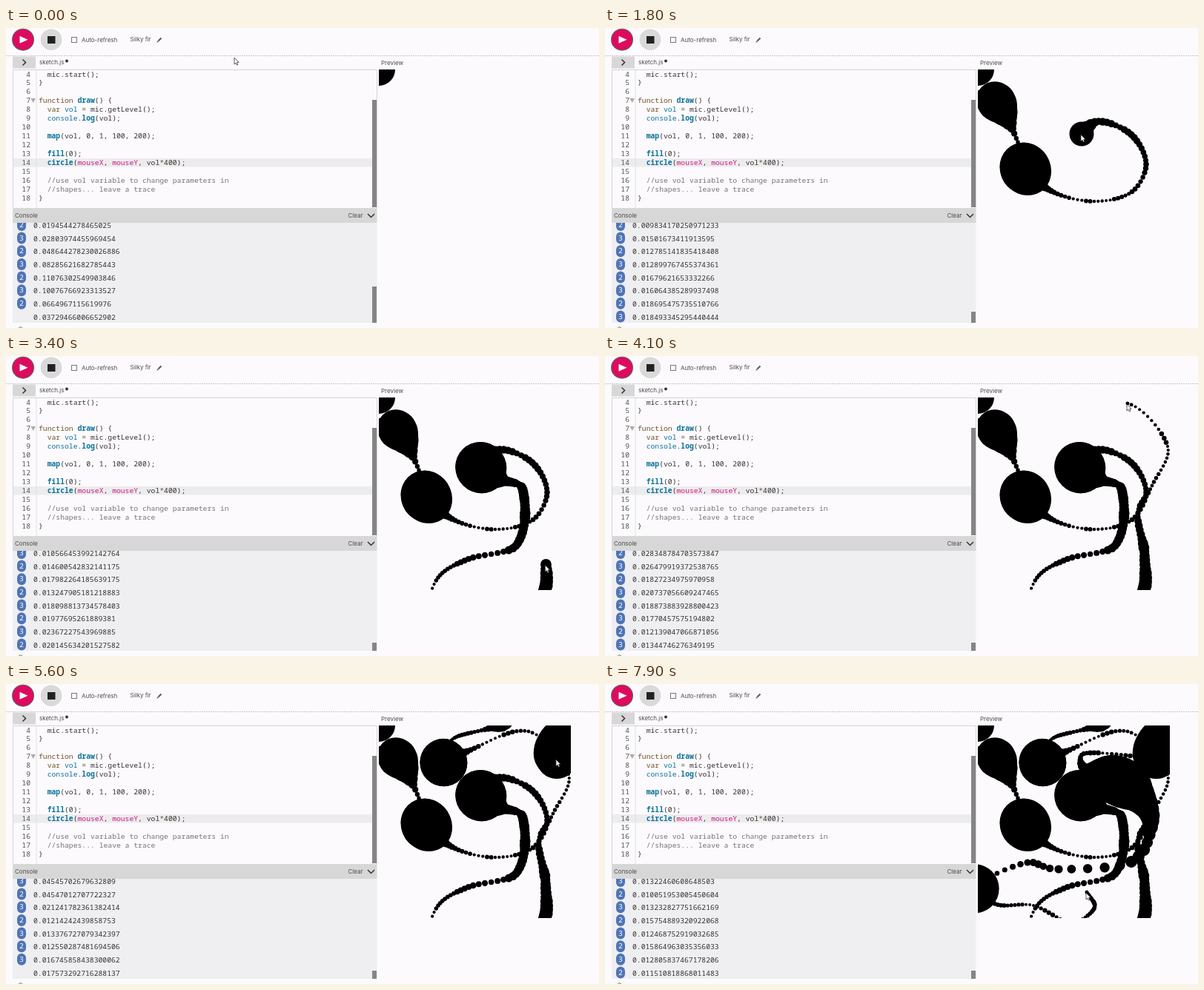
These frames come from a looping animation (800 px wide and 405 px high, 8000 ms). An HTML page with a canvas:

```html
<!DOCTYPE html>
<html lang="en">
<head>
<meta charset="utf-8">
<title>Sound sketch</title>
<style>
  html, body { margin: 0; width: 100%; height: 100%; overflow: hidden; background: #fcfafd; }
  canvas { display: block; }
</style>
</head>
<body>
<canvas id="stage" width="800" height="405"></canvas>
<script>
const ctx = document.getElementById('stage').getContext('2d');
const LOOP = 8000, STEP = 100, DRAWS_PER_STEP = 6, LOGS_PER_STEP = 2.7, LOG_LAG = 18;
const UI = '8px Inter, sans-serif';
const MONO = '9.73px "Noto Sans Mono", monospace';
const BLUE = '#0b7299', BROWN = '#704f21', PINK = '#d3177f', INK = '#333', UI_INK = '#4a4a4a';

// Turning points of the mouse: [sketch frame, x, y].
const mouse = [
  [0, 309, 39], [18, 498, 86], [28, 531, 103], [36, 557, 154], [48, 567, 190],
  // wide arc
  [60, 606, 222], [70, 660, 234], [80, 711, 221], [87, 730, 184], [95, 710, 144], [103, 666, 126],
  // hook
  [108, 643, 143], [116, 643, 153], [122, 666, 166], [131, 697, 180], [147, 688, 256],
  [156, 624, 274], [166, 583, 299], [174, 578, 335],
  // up the right side and along the top
  [195, 718, 325], [206, 728, 270], [216, 719, 212], [224, 738, 175], [234, 759, 122], [246, 705, 64],
  [261, 622, 91], [270, 591, 107], [287, 603, 74], [300, 655, 59], [316, 730, 34], [324, 755, 48],
  // through the middle to the lower left
  [336, 743, 101], [342, 764, 103], [351, 720, 98], [364, 646, 94], [370, 647, 114], [384, 708, 140],
  [391, 736, 185], [397, 710, 240], [402, 612, 250], [407, 570, 241], [414, 506, 267],
  [423, 501, 279], [432, 530, 298], [442, 578, 299], [452, 628, 322], [462, 660, 303], [474, 650, 281]
];

// Sounds heard by the microphone: [sketch frame, loudness, length].
const sounds = [
  [-24, 20, 5], [27, 24, 4.5], [48, 31, 5.5], [96, 2, 8], [114, 31, 6.5], [138, 4, 14],
  [199, 6, 14], [271, 29, 6], [303, 8, 3], [333, 29, 8], [381, 31, 8], [398, 4, 9], [421, 31, 4]
];

const random = n => Math.abs(Math.sin(n * 12.9898) * 43758.5453) % 1;

function radius(f) {
  const hiss = 1.9 + 1.5 * random(Math.floor(f / 2.5) + 50);
  return sounds.reduce((sum, [at, peak, len]) => sum + peak * Math.exp(-(((f - at) / len) ** 2)), hiss);
}

// Hermite curve through the turning points.
function mouseAt(f) {
  const last = mouse.length - 1;
  const key = i => mouse[Math.max(0, Math.min(last, i))];
  const i = Math.max(0, Math.min(last, mouse.findIndex(k => k[0] >= f)) - 1);
  const [a, b, c, d] = [key(i - 1), key(i), key(i + 1), key(i + 2)];
  const span = c[0] - b[0], u = (f - b[0]) / span;
  return [1, 2].map(n => {
    const m0 = (c[n] - a[n]) / (c[0] - a[0]) * span;
    const m1 = (d[n] - b[n]) / (d[0] - b[0]) * span;
    const rise = c[n] - b[n];
    return b[n] + u * (m0 + u * (3 * rise - 2 * m0 - m1 + u * (m0 + m1 - 2 * rise)));
  });
}

const code = [
  '  mic.start();', '}', '', 'function draw() {', '  var vol = mic.getLevel();',
  '  console.log(vol);', '', '  map(vol, 0, 1, 100, 200);', '', '  fill(0);',
  '  circle(mouseX, mouseY, vol*400);', '', '  //use vol variable to change parameters in',
  '  //shapes... leave a trace', '}'
];
const tint = {
  function: BROWN, var: BROWN, '=': BROWN, '*': BROWN, mouseX: PINK, mouseY: PINK,
  console: BLUE, log: BLUE, draw: BLUE, map: BLUE, fill: BLUE, circle: BLUE
};
const bold = ['draw', 'log', 'map', 'fill', 'circle'];

function box(x, y, w, h, color) {
  ctx.fillStyle = color;
  ctx.fillRect(x, y, w, h);
}
function disc(x, y, r, color) {
  ctx.fillStyle = color;
  ctx.beginPath();
  ctx.arc(x, y, r, 0, 2 * Math.PI);
  ctx.fill();
}
function poly(color, ...pts) {
  ctx.fillStyle = color;
  ctx.beginPath();
  pts.forEach(([x, y]) => ctx.lineTo(x, y));
  ctx.closePath();
  ctx.fill();
}
function line(color, width, ...pts) {
  ctx.strokeStyle = color;
  ctx.lineWidth = width;
  ctx.beginPath();
  pts.forEach(([x, y]) => ctx.lineTo(x, y));
  ctx.stroke();
}
function text(str, x, y, color = UI_INK, font = UI) {
  ctx.font = font;
  ctx.fillStyle = color;
  ctx.fillText(str, x, y);
}
function clipped(x, y, w, h, draw) {
  ctx.save();
  ctx.beginPath();
  ctx.rect(x, y, w, h);
  ctx.clip();
  draw();
  ctx.restore();
}

function drawToolbar() {
  disc(23, 15.7, 15, '#666');
  disc(23, 15.7, 14, '#dd0b5f');
  poly('#fff', [18.5, 10.7], [29.5, 15.7], [18.5, 20.7]);
  disc(61, 15.7, 14.3, '#d9d9d9');
  box(56, 11, 10.5, 10, '#222');
  ctx.strokeStyle = '#777';
  ctx.lineWidth = 1;
  ctx.strokeRect(88.5, 12.5, 7, 7);
  text('Auto-refresh', 102, 18.7);
  text('Silky fir', 167.5, 18.3);
  line('#555', 2, [205.5, 17.5], [209.5, 13.5]);
  poly('#555', [203.5, 19.5], [204, 17], [206, 19]);
  ctx.setLineDash([2, 1]);
  line('#c9c7ca', 1, [0, 37.5], [800, 37.5]);
  ctx.setLineDash([]);
}

function drawEditor() {
  box(9, 38.5, 31, 16, '#d7d7d7');
  line('#333', 1.5, [22.5, 42.5], [26.5, 46.5], [22.5, 50.5]);
  text('sketch.js', 45, 49);
  disc(82, 44.5, 2, INK);
  text('Preview', 506, 49.5);
  box(9, 176, 485, 11.5, '#ececee');
  line('#d4d4d4', 1, [500.5, 243], [500.5, 56.5], [9.5, 56.5], [9.5, 243]);
  box(40.5, 57, 1, 186, '#e0dfe1');
  clipped(9, 57, 490, 186, () => code.forEach((src, i) => {
    const y = 65.5 + i * 11.95, num = i + 4;
    ctx.textAlign = 'right';
    text(num, 33, y, '#555', MONO);
    ctx.textAlign = 'left';
    for (const m of src.matchAll(/\/\/.*|\w+|[^\w\s]/g)) {
      const word = m[0];
      ctx.font = MONO;
      const x = 44 + ctx.measureText(src.slice(0, m.index)).width;
      const color = word.startsWith('//') ? '#747474'
        : word === 'vol' && src.includes('var') ? BLUE : tint[word] || INK;
      text(word, x, y, color, (bold.includes(word) ? 'bold ' : '') + MONO);
    }
  }));
  poly('#aaa', [33.5, 95], [40, 95], [36.7, 101]);
  box(494, 97, 6, 145, '#858585');
}

function drawConsole(step) {
  box(9, 243, 491.5, 20, '#d7d7d7');
  text('Console', 12, 256);
  text('Clear', 461.5, 256);
  line('#333', 1.5, [488, 251], [492.5, 255.5], [497, 251]);
  box(9, 263, 491.5, 135, '#efeef0');
  clipped(9, 263, 491, 135, () => {
    const logged = step * LOGS_PER_STEP, newest = Math.floor(logged);
    for (let j = 0; j < 8; j++) {
      const y = 390 - j * 17.65, row = newest - j;
      const level = radius(row / LOGS_PER_STEP * DRAWS_PER_STEP - LOG_LAG) / 200;
      text(String(level).slice(0, 20), 37, y + 3.5, INK, MONO);
      // a row gets its repeat badge once it has been logged twice
      if (j === 0 && logged - newest < 0.25) continue;
      ctx.fillStyle = '#4f74b5';
      ctx.beginPath();
      ctx.roundRect(15, y - 8.5, 12, 16, 6);
      ctx.fill();
      text(row % 2 ? 2 : 3, 18.1, y + 2.5, '#fff', MONO);
    }
  });
  const thumb = Math.max(11, 135 * 135 / (372 + 46.8 * step));
  box(494, 398 - thumb, 6, thumb, '#858585');
  line('#777', 1, [17, 405], [20, 403.5], [22, 405]);
}

function drawPreview(frame) {
  clipped(503, 56, 259, 260, () => {
    disc(503, 56, 22, '#000');
    for (let f = 1; f <= frame; f++) disc(...mouseAt(f), radius(f), '#000');
  });
}

function drawCursor([x, y]) {
  ctx.save();
  ctx.translate(x - 1, y + 1);
  poly('#fff', [0, 0], [0, 9], [2, 7.2], [3.4, 10], [4.9, 9.4], [3.6, 6.5], [6, 6.3]);
  ctx.strokeStyle = '#333';
  ctx.lineWidth = 0.8;
  ctx.stroke();
  ctx.restore();
}

let shown = -1;
function tick(now) {
  const step = Math.floor(now % LOOP / STEP);
  if (step !== shown) {
    shown = step;
    const frame = step * DRAWS_PER_STEP;
    box(0, 0, 800, 405, '#fcfafd');
    drawToolbar();
    drawEditor();
    drawConsole(step);
    drawPreview(frame);
    drawCursor(mouseAt(frame));
  }
  requestAnimationFrame(tick);
}
requestAnimationFrame(tick);
</script>
</body>
</html>
```
